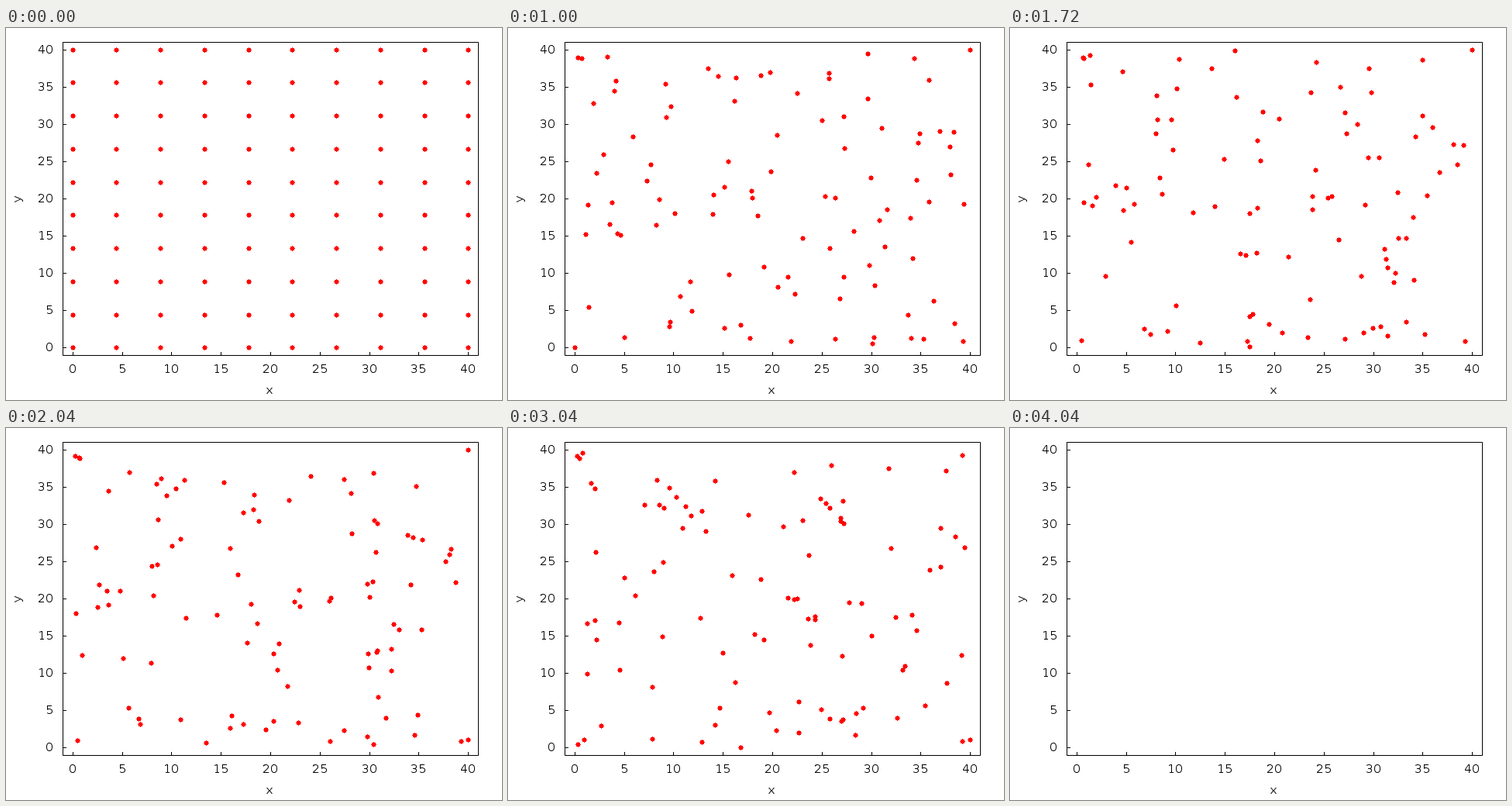
A matplotlib script for the animation above (4080 ms loop, 640 by 480 pixels).

```python
import numpy as np
import matplotlib.pyplot as plt
from matplotlib.animation import FuncAnimation
from matplotlib.collections import LineCollection, PolyCollection

W, H = 640, 480
LEFT, RIGHT, TOP, BOTTOM = 73, 609, 18, 422
SIZE = 40
FRAMES = 102
STRIDE = 1.1    # length of one step
REACH = 1.2     # a corner holds walkers this close to both walls
ESCAPE = 0.02   # chance per step to get loose from a corner

# Whole-pixel hinting keeps the digits evenly spaced
plt.rcParams.update({"text.hinting": "default", "text.hinting_factor": 1,
                     "font.family": "DejaVu Sans", "font.size": 10.8})


def to_px(x, y):
    """Centre of the pixel that shows the data point (x, y)."""
    px = LEFT + (np.asarray(x) + 1) * (RIGHT - LEFT) / (SIZE + 2)
    py = BOTTOM - (np.asarray(y) + 1) * (BOTTOM - TOP) / (SIZE + 2)
    return np.floor(px + 0.5) + 0.5, np.floor(py + 0.5) + 0.5


def random_walk(steps):
    """Walkers leave a grid, turn back at walls and linger in corners."""
    rng = np.random.default_rng(12)
    side = np.linspace(0, SIZE, 10)
    pos = np.array([(x, y) for x in side for y in side])
    path = [pos]
    for _ in range(steps):
        angle = rng.uniform(0, 2 * np.pi, len(pos))
        step = STRIDE * np.column_stack([np.cos(angle), np.sin(angle)])
        outside = (pos + step < 0) | (pos + step > SIZE)
        step[outside] *= -1
        cornered = (np.minimum(pos, SIZE - pos) < REACH).all(axis=1)
        step[cornered & (rng.random(len(pos)) > ESCAPE)] = 0
        pos = pos + step
        path.append(pos)
    return path


def dot_outline():
    """A 5 px square with a 1 px bump on each side."""
    parts = [np.array([(-0.5, -3.5), (0.5, -3.5), (0.5, -2.5),
                       (2.5, -2.5), (2.5, -0.5)])]
    for _ in range(3):
        x, y = parts[-1].T
        parts.append(np.column_stack([-y, x]))
    return np.concatenate(parts)


fig = plt.figure(figsize=(W / 100, H / 100), dpi=100, facecolor="white")
ax = fig.add_axes([0, 0, 1, 1])
ax.set_xlim(0, W)
ax.set_ylim(H, 0)
ax.set_axis_off()


def label(x, y, text, **kw):
    ax.text(x, y, text, **{"ha": "center", "va": "baseline", **kw})


l, r, t, b = LEFT + 0.5, RIGHT + 0.5, TOP + 0.5, BOTTOM + 0.5
lines = [[(l, t), (r, t), (r, b), (l, b), (l, t)]]
for v in range(0, SIZE + 1, 5):
    x, y = to_px(v, v)
    lines += [[(x, b), (x, b - 4)], [(l, y), (l + 4, y)]]
    label(x - 0.5, 445, str(v))
    label(61, y + 4.5, str(v), ha="right")
ax.add_collection(LineCollection(lines, colors="black", linewidths=0.72,
                                 capstyle="projecting", joinstyle="miter",
                                 snap=False), autolim=False)
label(339.5, 472, "x")
label(20, 220.5, "y", rotation=90, rotation_mode="anchor")

dots = PolyCollection([], facecolors="#ff0000", linewidths=0,
                      antialiaseds=False, zorder=3)
ax.add_collection(dots, autolim=False)

path = random_walk(FRAMES - 2)
outline = dot_outline()


def draw(frame):
    # The last frame shows the empty plot
    if frame < len(path):
        centres = np.column_stack(to_px(*path[frame].T))
        dots.set_verts(centres[:, None] + outline)
    else:
        dots.set_verts([])
    return [dots]


anim = FuncAnimation(fig, draw, frames=FRAMES, interval=40,
                     init_func=lambda: draw(0), repeat=True, repeat_delay=0)
plt.show()
```
